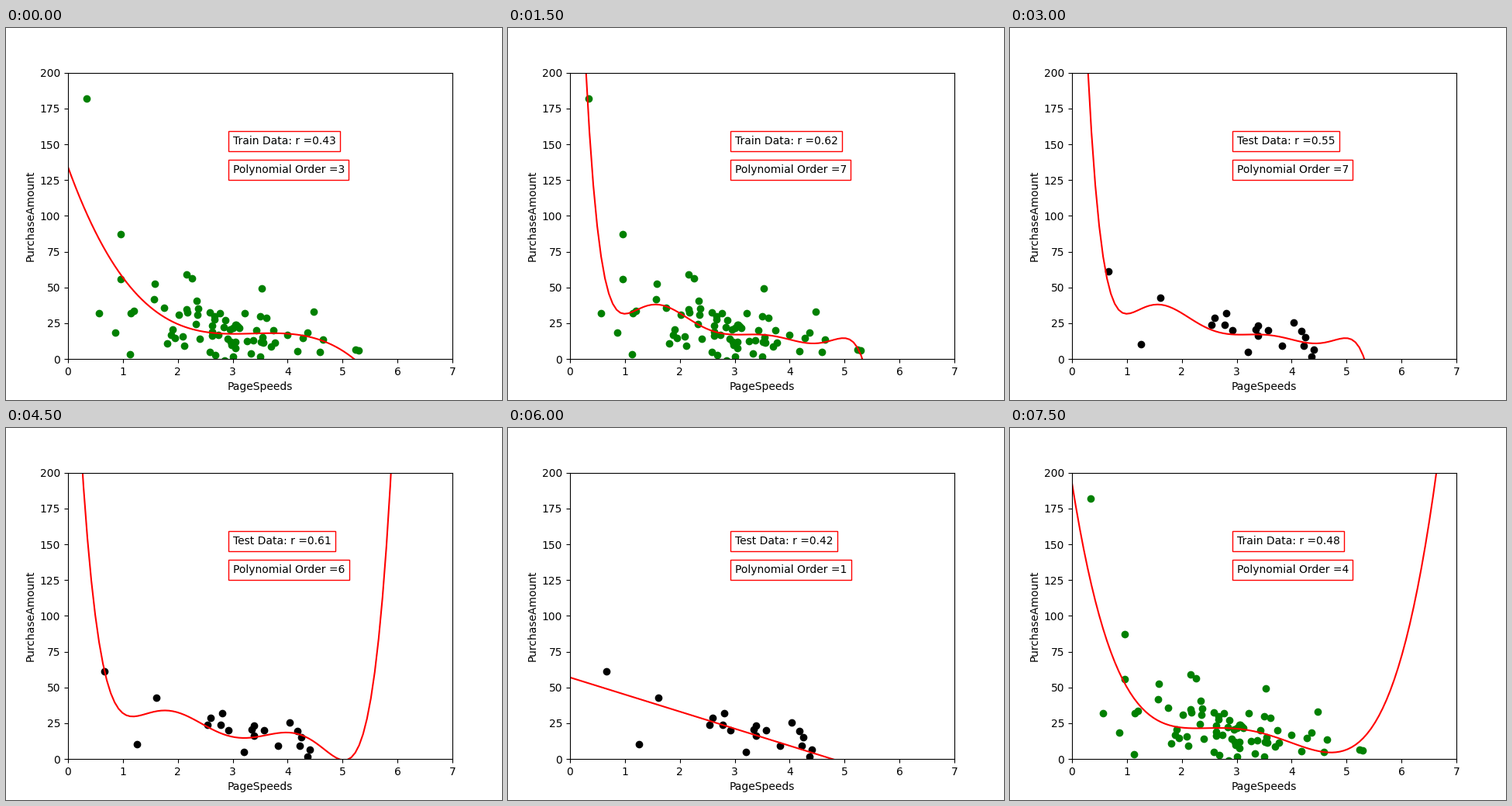
A matplotlib script that plays this animation: 640x480 px, repeating every 8000 ms.

```python
import numpy as np
import matplotlib.pyplot as plt
from matplotlib.animation import FuncAnimation

TICK_MS = 500
# (dataset, polynomial order, ticks on screen)
SCENES = [
    ("Train", 3, 3),
    ("Train", 7, 3),
    ("Test", 7, 3),
    ("Test", 6, 3),
    ("Test", 1, 3),
    ("Train", 4, 1),
]
TIMELINE = [(name, order) for name, order, ticks in SCENES for _ in range(ticks)]

np.random.seed(2)
speeds = np.random.normal(3.0, 1.0, 100)
amounts = np.random.normal(50.0, 30.0, 100) / speeds

DATA = {
    "Train": (speeds[:80], amounts[:80], "green"),
    "Test": (speeds[80:], amounts[80:], "black"),
}
grid = np.linspace(0, 7, 100)


def fit(order):
    x, y, _ = DATA["Train"]
    return np.poly1d(np.polyfit(x, y, order))


def r_squared(y, predicted):
    return 1 - np.sum((y - predicted) ** 2) / np.sum((y - y.mean()) ** 2)


fig, ax = plt.subplots(figsize=(6.4, 4.8), dpi=100)
ax.set(xlim=(0, 7), ylim=(0, 200), xlabel="PageSpeeds", ylabel="PurchaseAmount")

dots = {name: ax.scatter(x, y, c=color) for name, (x, y, color) in DATA.items()}
curve, = ax.plot([], [], color="red")
box = dict(facecolor="white", edgecolor="red")
score_label = ax.text(3, 150, "", bbox=box)
order_label = ax.text(3, 130, "", bbox=box)


def draw(i):
    name, order = TIMELINE[i]
    model = fit(order)
    x, y, _ = DATA[name]
    for key, points in dots.items():
        points.set_visible(key == name)
    curve.set_data(grid, model(grid))
    score_label.set_text(f"{name} Data: r ={r_squared(y, model(x)):.2f}")
    order_label.set_text(f"Polynomial Order ={order}")
    return [*dots.values(), curve, score_label, order_label]


anim = FuncAnimation(fig, draw, frames=len(TIMELINE), interval=TICK_MS,
                     init_func=lambda: draw(0), repeat=True, repeat_delay=0)
plt.show()
```
